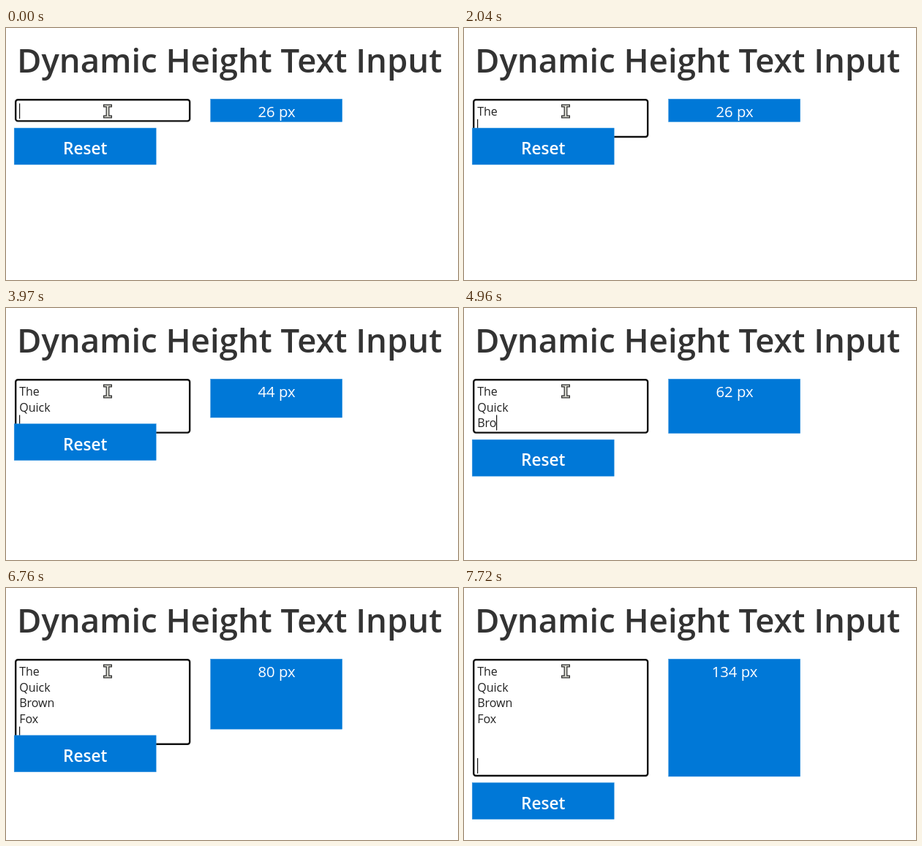
An HTML page that plays this animation: 618 by 345 pixels, repeating every 8000 ms.

```html
<!DOCTYPE html>
<html lang="en">
<head>
<meta charset="utf-8">
<title>Dynamic Height Text Input</title>
<style>
  html, body { margin: 0; width: 100%; height: 100%; overflow: hidden; background: #fff; }
  svg { display: block; width: 618px; height: 345px; font-family: "Open Sans", "Noto Sans", sans-serif; }
  .blue { fill: #0078d7; stroke: #3393df; stroke-width: .5; }
  .label { fill: #fff; text-anchor: middle; }
</style>
</head>
<body>
<svg viewBox="0 0 618 345">
  <text x="15" y="61" font-size="45.5" font-weight="600" fill="#333">Dynamic Height Text Input</text>
  <rect id="field" x="13.2" y="98.2" width="238" rx="3" fill="#fff" stroke="#101010" stroke-width="2.4"/>
  <g id="lines" font-size="16" fill="#222"></g>
  <rect id="caret" width="1.2" height="21" fill="#111"/>
  <path d="M133.6 105.1h10.8v2.8h-3.6v12.2h3.6v2.8h-10.8v-2.8h3.6v-12.2h-3.6z"
        fill="#d8d8d0" stroke="#2a2a2a" stroke-width="1.2"/>
  <rect id="panel" class="blue" x="279.7" y="97.2" width="180"/>
  <text id="size" class="label" x="370" y="122" font-size="20.3"></text>
  <g id="reset">
    <rect class="blue" x="11.2" y="137" width="194" height="50"/>
    <text class="label" x="108.3" y="173" font-size="22.6" font-weight="600">Reset</text>
  </g>
</svg>
<script>
const LOOP = 8000, ROW = 21.6;
const typed = "The\nQuick\nBrown\nFox\n\n\n";
const keyTimes = [1240, 1440, 1560, 2040, 2760, 3090, 3240, 3440, 3640, 3970,
  4430, 4760, 4960, 5160, 5290, 5560, 5960, 6160, 6360, 6760, 7240, 7640];
// The panel and button follow each new line slightly late.
const layoutTimes = [2160, 4040, 5710, 6840, 7310, 7720];
const caretOff = [[560, 1090], [2560, 2760]];

const $ = id => document.getElementById(id);
const passed = (times, t) => times.filter(x => x <= t).length;

const lineNodes = typed.split("\n").map((_, i) => {
  const node = document.createElementNS("http://www.w3.org/2000/svg", "text");
  node.setAttribute("x", 18.2);
  node.setAttribute("y", 120 + i * ROW);
  return $("lines").appendChild(node);
});

function draw(t) {
  const lines = typed.slice(0, passed(keyTimes, t)).split("\n");
  const last = lines.length - 1;
  const grown = passed(layoutTimes, t);

  lineNodes.forEach((node, i) => node.textContent = lines[i] || "");
  $("field").setAttribute("height", 29.2 + last * ROW);

  const width = lines[last] ? lineNodes[last].getComputedTextLength() : 0;
  $("caret").setAttribute("x", Math.round(18.2 + width));
  $("caret").setAttribute("y", 103.3 + last * ROW);
  $("caret").setAttribute("visibility", caretOff.some(([a, b]) => t >= a && t < b) ? "hidden" : "visible");

  $("panel").setAttribute("height", 31.2 + grown * ROW);
  $("size").textContent = `${26 + 18 * grown} px`;
  $("reset").setAttribute("transform", `translate(0 ${grown * ROW})`);
}

const start = performance.now();
function tick() {
  draw((performance.now() - start) % LOOP);
  requestAnimationFrame(tick);
}
tick();
</script>
</body>
</html>
```
